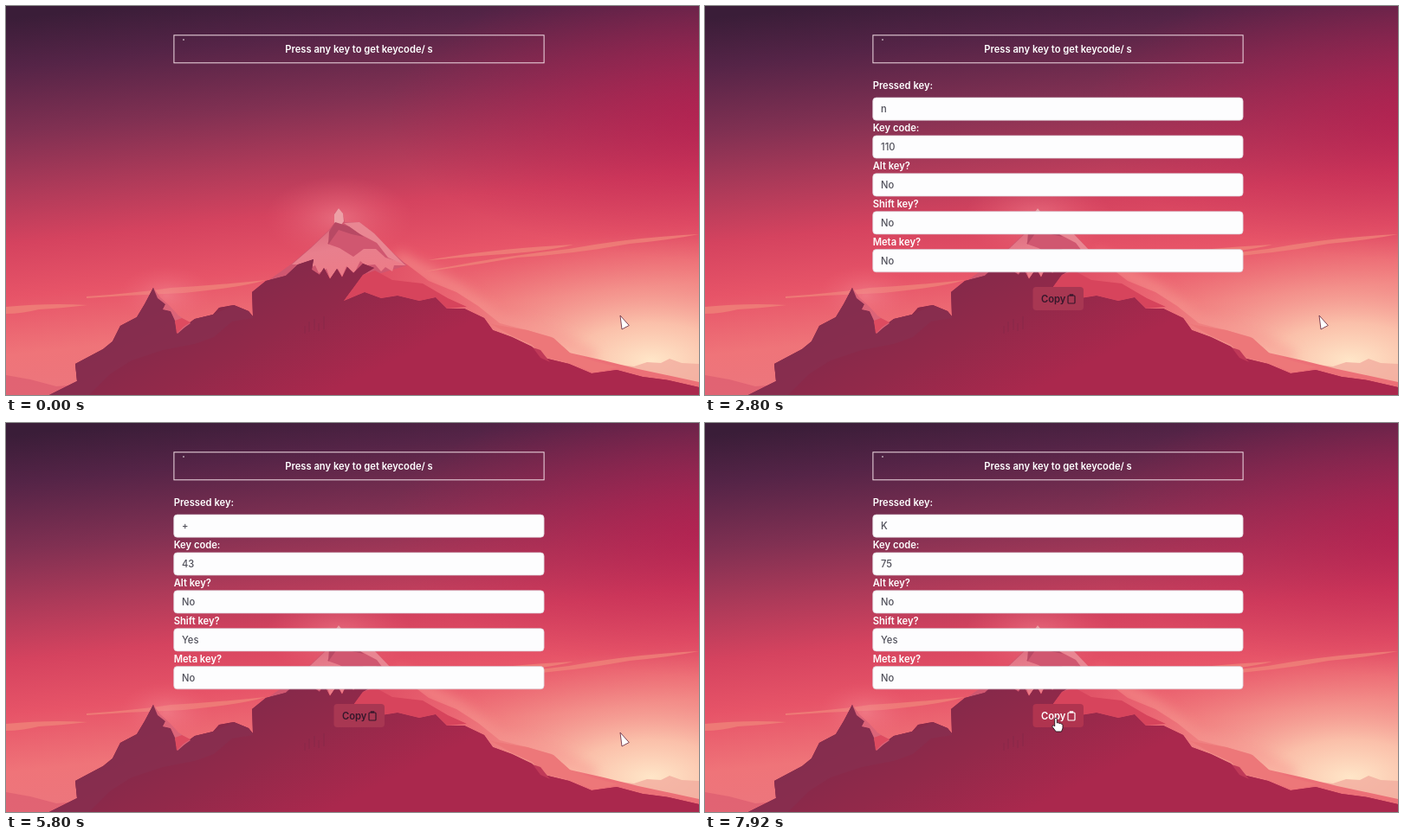
Animation, 800 px wide and 450 px high, one loop 8 s. Source, as an HTML page:

```html
<!DOCTYPE html>
<html lang="en">
<head>
<meta charset="utf-8">
<title>Key codes</title>
<style>
html, body { margin: 0; width: 100%; height: 100%; overflow: hidden; background: #8a2d50; }
svg { display: block; width: 100vw; height: 100vh; }
text { font-family: Inter, Roboto, sans-serif; font-size: 11.2px; font-weight: 600; fill: #fff; }
.value { font-weight: 500; fill: #50505a; }
</style>
</head>
<body>
<svg viewBox="0 0 800 450" preserveAspectRatio="none">
  <defs>
    <linearGradient id="sky" gradientUnits="userSpaceOnUse" x1="370" y1="-25" x2="420" y2="445">
      <stop offset="0" stop-color="#3a1d38"/>
      <stop offset=".12" stop-color="#552447"/>
      <stop offset=".28" stop-color="#803052"/>
      <stop offset=".42" stop-color="#ad3a59"/>
      <stop offset=".55" stop-color="#d5435f"/>
      <stop offset=".68" stop-color="#e75468"/>
      <stop offset=".82" stop-color="#ef7479"/>
      <stop offset="1" stop-color="#ea777f"/>
    </linearGradient>
    <radialGradient id="crimson" gradientUnits="userSpaceOnUse" cx="0" cy="0" r="1" gradientTransform="translate(830 125) scale(390 170)">
      <stop offset="0" stop-color="#b5164d" stop-opacity=".65"/>
      <stop offset="1" stop-color="#b5164d" stop-opacity="0"/>
    </radialGradient>
    <radialGradient id="dawn" gradientUnits="userSpaceOnUse" cx="0" cy="0" r="1" gradientTransform="translate(745 410) scale(300 145)">
      <stop offset="0" stop-color="#ffe6c8"/>
      <stop offset=".3" stop-color="#fdcdb2" stop-opacity=".85"/>
      <stop offset=".65" stop-color="#f6a296" stop-opacity=".45"/>
      <stop offset="1" stop-color="#f07c7c" stop-opacity="0"/>
    </radialGradient>
    <radialGradient id="mist">
      <stop offset="0" stop-color="#f5909a" stop-opacity=".5"/>
      <stop offset="1" stop-color="#ee6878" stop-opacity="0"/>
    </radialGradient>
    <linearGradient id="rock" gradientUnits="userSpaceOnUse" x1="290" y1="290" x2="370" y2="450">
      <stop offset="0" stop-color="#81294a"/>
      <stop offset=".5" stop-color="#92294a"/>
      <stop offset="1" stop-color="#aa284d"/>
    </linearGradient>
    <radialGradient id="warm" gradientUnits="userSpaceOnUse" cx="0" cy="0" r="1" gradientTransform="translate(490 440) scale(210 120)">
      <stop offset="0" stop-color="#c0224f" stop-opacity=".75"/>
      <stop offset="1" stop-color="#b8264e" stop-opacity="0"/>
    </radialGradient>
    <linearGradient id="lit" gradientUnits="userSpaceOnUse" x1="400" y1="300" x2="670" y2="415">
      <stop offset="0" stop-color="#dc4860"/>
      <stop offset=".4" stop-color="#ea6572"/>
      <stop offset=".75" stop-color="#f28d88"/>
      <stop offset="1" stop-color="#ec7077"/>
    </linearGradient>
    <linearGradient id="snow" x1="0" y1="0" x2=".4" y2="1">
      <stop offset="0" stop-color="#d9657a"/>
      <stop offset=".5" stop-color="#e87f8d"/>
      <stop offset="1" stop-color="#ec7c88"/>
    </linearGradient>
    <filter id="soft" x="-30%" y="-30%" width="160%" height="160%"><feGaussianBlur stdDeviation="7"/></filter>
  </defs>

  <rect width="800" height="450" fill="url(#sky)"/>
  <rect width="800" height="450" fill="url(#crimson)"/>
  <rect width="800" height="450" fill="url(#dawn)"/>

  <g fill="#f0857a" opacity=".75">
    <path d="M0 348 Q50 343 94 346 Q60 350 38 351 Q18 356 0 356Z"/>
    <path d="M93 336 Q150 332 190 326 Q245 323 300 317 Q270 326 205 332 Q150 334 93 338Z"/>
    <path d="M487 294 Q560 281 655 276 Q625 284 560 288 Q525 291 487 294Z"/>
    <path d="M484 307 Q560 291 650 281 Q720 268 800 264 Q765 271 720 275 Q655 287 590 291 Q535 301 484 307Z"/>
  </g>
  <path d="M690 413 L725 417 740 412 756 413 766 408 780 413 800 414 V440 H690Z" fill="#f3ad9f" opacity=".8"/>
  <path d="M0 427 L28 432 58 440 85 438 V450 H0Z" fill="#df5f71" opacity=".8"/>

  <ellipse cx="384" cy="245" rx="85" ry="48" fill="url(#mist)"/>
  <ellipse cx="185" cy="335" rx="55" ry="35" fill="url(#mist)"/>
  <path d="M450 290 L520 328 570 366 635 382 680 408" fill="none" stroke="#f79a93" stroke-width="16" opacity=".55" filter="url(#soft)"/>

  <!-- sunlit slope and snow cap -->
  <path d="M400 304 L440 286 463 299 488 318 520 331 545 347 570 367 602 375 630 383 650 401 690 410 730 420 800 435 V450 H390Z" fill="url(#lit)"/>
  <path d="M284 331 L305 316 330 298 352 279 372 260 379 251 379 240 384 234 389 240 391 250 408 250 425 263 443 282 463 300 430 310 350 312 296 334Z" fill="#d05770"/>
  <path d="M330 299 L352 280 373 260 381 256 371 275 385 280 401 290 413 281 427 281 438 291 451 295 462 300 448 300 446 307 438 302 433 307 426 299 415 300 409 295 402 309 393 301 388 313 383 304 374 315 370 304 361 309 357 300 345 306 340 299Z" fill="url(#snow)"/>
  <path d="M379 251 V241 L384 234 389 240 390 249 385 256Z" fill="#eda0a6"/>
  <path d="M390 251 L408 250 425 263 447 286 461 300 441 291 428 274 407 263Z" fill="#e98692"/>
  <path d="M373 261 L380 250 396 255 413 267 399 264 384 259 372 276Z" fill="#b84964"/>

  <path id="body" d="M50 450 L82 434 80 414 112 397 123 388 132 370 151 360 160 345 170 326 175 336 184 345 181 351 190 353 195 362 197 377 207 370 218 362 239 357 246 349 263 346 280 353 285 359 284 331 300 318 323 312 337 299 355 293 353 305 362 311 367 303 374 316 382 304 388 314 394 302 401 309 412 298 425 303 412 311 404 322 390 341 414 331 433 338 452 335 477 341 496 337 509 350 529 350 552 361 562 375 584 383 607 394 621 407 650 414 676 425 705 421 735 429 765 433 800 441 V450Z" fill="url(#rock)"/>
  <use href="#body" style="fill:url(#warm)"/>
  <path d="M50 450 L82 434 80 414 112 397 123 388 132 370 151 360 160 345 170 326 175 336 184 345 181 351 190 353 195 362 197 377 207 370 218 362 239 357 263 346 280 353 286 361 261 365 240 383 218 391 181 398 145 410 120 426 96 450Z" fill="#873050" opacity=".65"/>
  <path d="M170 326 L178 337 189 347 199 358 213 367 206 372 198 379 195 364 190 353 181 351 184 345 175 338Z" fill="#dc6478"/>
  <path d="M195 364 L203 361 213 366 205 371 197 379Z" fill="#de4b60"/>
  <path d="M412 311 L426 306 446 317 481 321 510 338 532 348 509 350 496 337 477 341 452 335 433 338 414 331 390 341 404 322Z" fill="#d7445c"/>
  <path d="M560 368 L602 375 632 384 652 402 680 411 735 425 706 418 678 424 646 411 624 407 607 392 585 382Z" fill="#ed7779"/>
  <path d="M608 395 L617 398 628 412 617 407Z" fill="#c03958"/>
  <path d="M345 379 V370 M350 377 V365 M356 375 V362 M361 376 V367 M367 374 V359" stroke="#7b2846" opacity=".5"/>

  <rect x="193.9" y="33.8" width="427.2" height="32" fill="none" stroke="#f2dde5"/>
  <circle cx="205" cy="39" r=".8" fill="#fff"/>
  <text x="407.5" y="54" text-anchor="middle">Press any key to get keycode/ s</text>

  <g id="panel">
    <g id="fields"></g>
    <rect id="button" x="378.5" y="325" width="58.5" height="27" rx="4"/>
    <text id="copy" x="388" y="343">Copy</text>
    <g id="clip" fill="none">
      <path d="M421 335 H420 Q419 335 419 336 V343 Q419 344 420 344 H426 Q427 344 427 343 V336 Q427 335 426 335 H425" stroke-width="1.2"/>
      <path d="M421.5 335 V334 H424.5 V335Z" stroke-width="1.4"/>
    </g>
  </g>

  <g id="pointer">
    <path id="arrow" d="M0 0 L2 16 10.3 11.5Z" fill="#fff" stroke="#6f3448" stroke-width=".9" stroke-linejoin="round"/>
    <path id="hand" d="M-1.3 1 Q0 -.8 1.3 1 V6 Q3 5 4 6.5 Q5.5 5.5 6.3 7.2 Q8 6.7 8 8.8 V12 L6.5 16 H.2 L-4 10.5 Q-4.4 8.5 -2.5 8.8 L-1.3 10Z" fill="#fff" stroke="#26121c" stroke-width=".9" stroke-linejoin="round"/>
  </g>
</svg>
<script>
const LOOP = 8000;
const el = id => document.getElementById(id);
const labels = ['Pressed key:', 'Key code:', 'Alt key?', 'Shift key?', 'Meta key?'];
const presses = [
  { at: 2640, values: ['n', '110', 'No', 'No', 'No'] },
  { at: 4360, values: ['+', '43', 'No', 'Yes', 'No'] },
  { at: 6040, values: ['K', '75', 'No', 'Yes', 'No'] }
];
const move = { from: 6920, to: 7720, start: [709, 358], end: [405, 341] };

el('fields').innerHTML = labels.map((label, i) => {
  const y = 106 + i * 43.9;
  return `<text x="193.7" y="${i ? y - 4.7 : 95.8}">${label}</text>
    <rect x="193.7" y="${y}" width="427.4" height="26.2" rx="4" fill="#fdfdfe" stroke="#d8cbd3" stroke-width=".7"/>
    <text class="value" x="203" y="${y + 17.1}"></text>`;
}).join('');
const values = document.querySelectorAll('.value');

function ease(t) {
  const p = Math.min(1, Math.max(0, t));
  return p * p * (3 - 2 * p);
}

function draw(t) {
  const press = presses.filter(p => t >= p.at).pop();
  el('panel').style.display = press ? '' : 'none';
  if (press) values.forEach((node, i) => { node.textContent = press.values[i]; });

  const p = ease((t - move.from) / (move.to - move.from));
  const [x, y] = move.start.map((v, i) => v + (move.end[i] - v) * p);
  const hover = x > 378 && x < 437 && y > 325 && y < 352;
  el('pointer').setAttribute('transform', `translate(${x} ${y})`);
  el('arrow').style.display = hover ? 'none' : '';
  el('hand').style.display = hover ? '' : 'none';
  const ink = hover ? '#fff' : '#35172b';
  el('copy').style.fill = ink;
  el('clip').style.stroke = ink;
  el('button').style.fill = hover ? '#b0344f' : '#a83752';
}

const began = performance.now();
function tick() {
  draw((performance.now() - began) % LOOP);
  requestAnimationFrame(tick);
}
tick();
</script>
</body>
</html>
```
